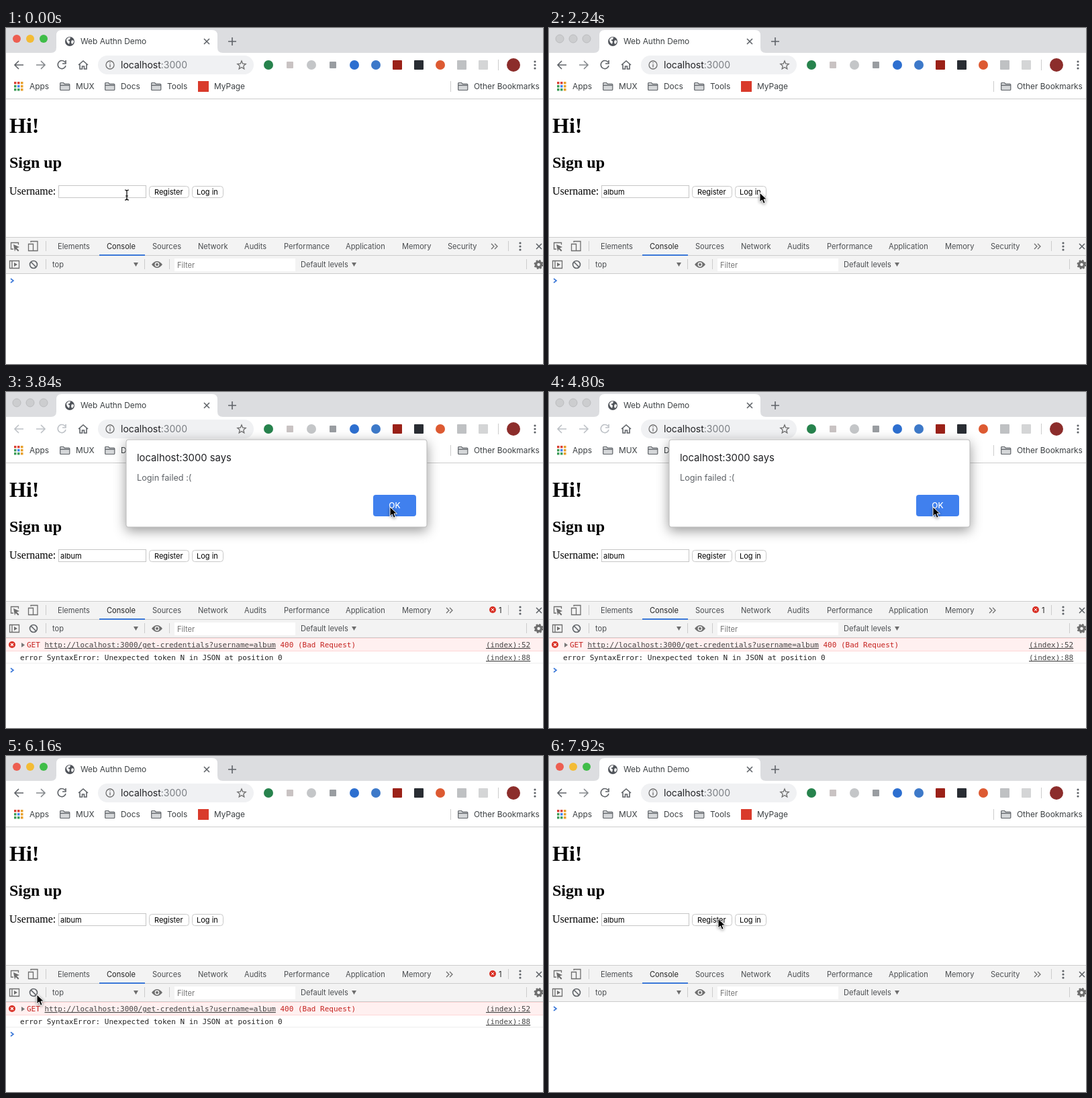
Recreate the animation shown at these times as an HTML page. Size 800 px wide and 500 px high, loop 8000 ms.

```html
<!DOCTYPE html>
<html lang="en">
<head>
<meta charset="utf-8">
<title>Web Authn Demo</title>
<style>
  html, body { margin: 0; width: 100%; height: 100%; overflow: hidden; background: #fff; }
  svg { display: block; width: 800px; height: 500px; }
  text { font-family: Inter, Roboto, sans-serif; font-size: 11.9px; fill: #3c4043; white-space: pre; }
  .page text { font-family: "Liberation Serif", serif; font-size: 16px; fill: #000; }
  .page .heading { font-weight: bold; }
  .page .control { font: 11px Inter, sans-serif; }
  .dev text { font-size: 11.1px; fill: #4a4d50; }
  .dev .log text { font: 11px "DejaVu Sans Mono", monospace; fill: #222; }
  .dev .log .red { fill: #c5221f; }
  .dev .log .link { fill: #444; text-decoration: underline; }
  .line { fill: none; stroke: #5f6368; stroke-width: 1.6; }
  .thin { fill: none; stroke: #6e6e6e; stroke-width: 1.3; }
  .rule { fill: none; stroke: #ccc; }
  .soft { filter: drop-shadow(0 1px 2px #0007); }
</style>
</head>
<body>
<svg viewBox="0 0 800 500">
  <defs>
    <path id="folder" d="M.7 10.5V1.5q0-1 1-1h4l1.6 1.8h6.5q1 0 1 1v7.2q0 1-1 1H1.7q-1 0-1-1zM1 4.3h13.5" fill="#d5d7d9" stroke="#5f6368" stroke-width="1.2"/>
    <g id="dots"><circle cy="-5" r="1.6"/><circle r="1.6"/><circle cy="5" r="1.6"/></g>
  </defs>
  <rect width="800" height="500" fill="#fff"/>

  <!-- tab strip -->
  <rect width="800" height="37" fill="#dcdde0"/>
  <path d="M67 37q8 0 8-8V11q0-8 8-8h224q8 0 8 8v18q0 8 8 8z" fill="#fff"/>
  <g id="lights"><circle cx="16" cy="16" r="6"/><circle cx="36" cy="16" r="6"/><circle cx="56" cy="16" r="6"/></g>
  <circle cx="95" cy="20" r="7" fill="#50545a"/>
  <path d="M90 17q3-4 6-3l-1 3-3 1 3 2-1 4q-4-2-4-7zm8 1l3 1q0 4-3 5l-1-3z" fill="#fff"/>
  <text x="111" y="24">Web Authn Demo</text>
  <path class="line" d="M295 16l8 8m0-8l-8 8M331 20h12m-6-6v12"/>

  <!-- toolbar -->
  <g class="line">
    <g id="nav">
      <path d="M26 55H13m6-6l-6 6 6 6"/>
      <path id="forward" d="M45 55h13m-6-6l6 6-6 6"/>
      <path d="M88 51a6 6 0 1 0 1 5m0-8v5h-5"/>
    </g>
    <path d="M108 55l7-6 7 6m-12-1v7h3.500v-4h3v4h3.500v-7"/>
  </g>
  <rect x="137" y="41" width="232" height="28" rx="14" fill="#f0f1f3"/>
  <circle class="thin" cx="155" cy="55" r="6"/>
  <path class="thin" d="M155 51v1.500m0 1.500v4.500"/>
  <text x="171" y="60" style="font-size:14px;fill:#202124">localhost<tspan fill="#7a7e83">:3000</tspan></text>
  <path class="thin" d="M351 49l1.700 4.100 4.500.4-3.400 2.900 1 4.400-3.800-2.300-3.800 2.300 1-4.400-3.400-2.900 4.500-.4z"/>
  <g id="extensions"></g>
  <path class="rule" d="M733.500 47v16M662.500 79v16"/>
  <circle cx="756" cy="55" r="10" fill="#8c2d2b"/>
  <use href="#dots" x="788" y="55" fill="#5f6368"/>

  <!-- bookmarks -->
  <g id="apps"></g>
  <text x="35" y="91">Apps</text>
  <use href="#folder" x="80" y="81"/><text x="104" y="91">MUX</text>
  <use href="#folder" x="147" y="81"/><text x="171" y="91">Docs</text>
  <use href="#folder" x="216" y="81"/><text x="240" y="91">Tools</text>
  <rect x="286" y="79" width="16" height="16" fill="#d93a2b"/><text x="310" y="91">MyPage</text>
  <use href="#folder" x="673" y="81"/><text x="697" y="91">Other Bookmarks</text>
  <path class="rule" d="M0 105.500h800"/>

  <g class="page">
    <text class="heading" x="5" y="156" style="font-size:32px">Hi!</text>
    <text class="heading" x="5" y="208" style="font-size:24px">Sign up</text>
    <text x="5" y="248">Username:</text>
    <rect x="78.500" y="234.500" width="130" height="18" fill="#fff" stroke="#c6c6c6"/>
    <rect id="focus" x="78" y="234" width="131.500" height="19" rx="1.500" fill="none" stroke="#5e93e5" stroke-width="2.600"/>
    <text class="control" id="typed" x="81" y="248"></text>
    <path id="caret" d="M0 237v13" stroke="#000"/>
    <g fill="#fff" stroke="#c9c9c9">
      <rect x="213.500" y="235.500" width="59" height="17" rx="4"/>
      <rect x="277.500" y="235.500" width="46" height="17" rx="4"/>
    </g>
    <text class="control" x="221" y="248">Register</text>
    <text class="control" x="284" y="248">Log in</text>
  </g>

  <g class="dev">
    <rect y="312" width="800" height="53" fill="#f3f3f3"/>
    <path class="rule" d="M0 311.500h800M0 338.500h800M0 365.500h800M59.500 317v15M748.500 317v15M59.500 344v15M206.500 344v15M243.500 344v15M775.500 344v15"/>
    <path class="thin" d="M11 329H7.500v-9.500h11v3M37 319v-1.500h10v14h-6M33.500 321.500h7v10h-7z"/>
    <path d="M11 322l9 4-4 1.500 3.500 3.500-1.500 1.500-3.500-3.500-1.500 3.500z" fill="#6e6e6e"/>
    <text x="77" y="329">Elements</text>
    <text x="150" y="329" style="fill:#222">Console</text>
    <text x="218" y="329">Sources</text>
    <text x="286" y="329">Network</text>
    <text x="355" y="329">Audits</text>
    <text x="414" y="329">Performance</text>
    <text x="506" y="329">Application</text>
    <text x="590" y="329">Memory</text>
    <text id="security" x="658" y="329">Security</text>
    <path id="more" class="thin" d="M0 321l4 4-4 4m5-8l4 4-4 4"/>
    <rect x="139" y="337" width="68" height="2" fill="#3b78d8"/>
    <use href="#dots" x="766" y="325" fill="#5f6368"/>
    <path class="line" d="M790 321l8 8m0-8l-8 8"/>

    <path class="thin" d="M5.500 346.500h14v11h-14zm3.500 0v11"/>
    <path d="M12 349l5 3-5 3zM190 349h7l-3.500 6zM515 349h7l-3.500 6z" fill="#6e6e6e"/>
    <g class="line"><circle cx="41" cy="352" r="5.500"/><path d="M37 348l8 8"/></g>
    <text x="69" y="356">top</text>
    <path d="M217 352q8-10 16 0-8 10-16 0" fill="#6e6e6e"/>
    <circle cx="225" cy="352" r="2.700" fill="#6e6e6e" stroke="#f3f3f3" stroke-width="1.400"/>
    <rect x="251" y="343" width="180" height="19" fill="#fff"/>
    <text x="255" y="357" style="fill:#777">Filter</text>
    <text x="439" y="356">Default levels</text>
    <circle cx="793.500" cy="352" r="4" fill="none" stroke="#6e6e6e" stroke-width="3.500"/>
    <circle cx="793.500" cy="352" r="6" fill="none" stroke="#6e6e6e" stroke-width="2" stroke-dasharray="2.500 2.210"/>

    <g id="errors" class="log">
      <circle cx="725" cy="324" r="5" fill="#d93025"/>
      <path d="M723 322l4 4m0-4l-4 4" stroke="#fff"/>
      <text x="734" y="329" style="font:11.100px Inter,sans-serif">1</text>
      <rect y="366" width="800" height="19" fill="#fff0f0"/>
      <path d="M0 366.500h800M0 385.500h800" stroke="#ffd7d7"/>
      <path d="M0 403.500h800" stroke="#eee"/>
      <circle cx="9" cy="376" r="5" fill="#d93025"/>
      <path d="M7 374l4 4m0-4l-4 4" stroke="#fff" stroke-width="1.300"/>
      <path d="M23 373l5 3.500-5 3.500z" fill="#777"/>
      <text class="red" x="31" y="380">GET <tspan class="link">http://localhost:3000/get-credentials?username=album</tspan> 400 (Bad Request)</text>
      <text class="link" x="715" y="380">(index):52</text>
      <text x="21" y="399">error SyntaxError: Unexpected token N in JSON at position 0</text>
      <text class="link" x="715" y="399">(index):88</text>
    </g>
    <path id="prompt" d="M7 373l4 3-4 3" fill="none" stroke="#3b78d8" stroke-width="1.600"/>
    <g id="tooltip">
      <rect class="soft" x="27" y="369" width="160" height="23" rx="2" fill="#fff"/>
      <text x="36" y="384">Clear console</text>
      <text x="118" y="384" style="fill:#888">Ctrl L</text>
      <text x="156" y="384" style="fill:#888">⌘ K</text>
    </g>
  </g>

  <g id="suggestions">
    <rect id="list" class="soft" x="78" y="254" width="192" rx="3" fill="#fff"/>
    <g id="names"></g>
  </g>

  <g id="dialog">
    <rect x="179" y="71" width="448" height="130" rx="3" fill="#fff" stroke="#bbb" style="filter:drop-shadow(0 5px 9px #0006)"/>
    <text x="195" y="103" style="font-size:14.800px;fill:#202124">localhost:3000 says</text>
    <text x="195" y="132" style="font-size:12.700px;fill:#5f6368">Login failed :(</text>
    <rect x="547" y="153" width="64" height="32" rx="4" fill="#4080ee"/>
    <text x="579" y="173" text-anchor="middle" style="font-weight:500;fill:#fff">OK</text>
  </g>

  <path id="beam" d="M-3-7q3 0 3 2V6q0 2-3 2M3-7q-3 0-3 2V6q0 2 3 2M-2 2h4" fill="none" stroke="#000" stroke-width="1.200"/>
  <path id="arrow" class="soft" d="M0 0v14l3.300-3 2.300 5.300 2.600-1.100L6 10h4.500z" fill="#000" stroke="#fff"/>
</svg>
<script>
const $ = id => document.getElementById(id);
const show = (id, on) => $(id).style.opacity = +on;
const clamp = v => Math.min(1, Math.max(0, v));
const between = (t, from, to) => t >= from && t < to;
const fade = (t, from, length) => clamp((t - from) / length);

const LOOP = 8000, STEP = 80;
const NAMES = ['acorn', 'atmo', 'bramble', 'demo', 'tester'];
const KEYS = [['a', 800], ['l', 960], ['b', 1200], ['u', 1360], ['m', 1520]];

// Pointer moves: start time, end time, from, to
const MOVES = [
  [1600, 2080, [180, 248], [314, 245]],
  [2800, 3600, [314, 245], [572, 171]],
  [5000, 6100, [572, 171], [46, 355]],
  [7000, 7760, [46, 355], [252, 242]],
];

// Toolbar icons reduced to plain shapes: round or square, and colour
const ICONS = ['o#27834d', 's#c9c3c3', 'o#c4c6c8', 's#999da1', 'o#2d6fd0', 'o#3d79c9',
  's#9b2118', 's#292d33', 'o#dd5a32', 's#bfc1c3', 's#d4d5d6'];
$('extensions').innerHTML = ICONS.map((icon, i) => {
  const half = i === 1 || i === 3 ? 5 : 7;
  return `<rect x="${391 + i * 32 - half}" y="${55 - half}" width="${half * 2}" height="${half * 2}"
    rx="${icon[0] === 'o' ? half : 1}" fill="${icon.slice(1)}"/>`;
}).join('');

const APP_COLORS = ['#db4437', '#db4437', '#e8a02c', '#3f9e5a', '#4285f4', '#e8a02c', '#3f9e5a', '#3f9e5a', '#e8a02c'];
$('apps').innerHTML = APP_COLORS.map((color, i) =>
  `<rect x="${12 + i % 3 * 5}" y="${80 + Math.floor(i / 3) * 5}" width="3.5" height="3.500" fill="${color}"/>`).join('');

$('names').innerHTML = NAMES.map((name, i) =>
  `<text x="90" y="${285 + i * 36}" style="font-size:13px;font-weight:500;fill:#202124">${name}</text>`).join('');

const ease = p => p * p * (3 - 2 * p);

function pointerAt(t) {
  let position = MOVES[0][2];
  for (const [start, end, from, to] of MOVES) {
    if (t < start) break;
    const p = ease(clamp((t - start) / (end - start)));
    position = from.map((v, i) => v + (to[i] - v) * p);
  }
  return position;
}

function paintLights(active) {
  const colors = active ? ['#ed5e51', '#f3bc35', '#3fbd48'] : Array(3).fill('#cccdcf');
  [...$('lights').children].forEach((light, i) => {
    light.setAttribute('fill', colors[i]);
    light.setAttribute('stroke', active ? 'none' : '#bbbcbe');
  });
}

function draw(t) {
  const typed = KEYS.filter(key => t >= key[1]).map(key => key[0]).join('');
  const focused = between(t, 320, 2160);
  $('typed').textContent = typed;
  show('focus', focused);
  show('caret', focused && (t < 1600 || t % 1000 < 500));
  const caretX = typed ? 81 + $('typed').getComputedTextLength() : 82;
  $('caret').setAttribute('transform', `translate(${Math.round(caretX) + .5})`);

  const count = typed ? 2 : NAMES.length;
  show('suggestions', between(t, 320, 960));
  $('list').setAttribute('height', 16 + 36 * count);
  [...$('names').children].forEach((name, i) => name.style.opacity = +(i < count));

  paintLights(!between(t, 2160, 4960));
  const loading = between(t, 2320, 4960);
  $('nav').style.stroke = loading ? '#bdc1c6' : '#5f6368';
  $('forward').style.stroke = loading ? '#bdc1c6' : '#85898d';
  show('dialog', fade(t, 2240, 160) * (1 - fade(t, 4880, 240)));

  const failed = between(t, 2320, 6960);
  show('errors', failed);
  show('security', !failed);
  $('more').setAttribute('transform', `translate(${failed ? 656 : 723})`);
  $('prompt').setAttribute('transform', `translate(0 ${failed ? 38 : 0})`);
  show('tooltip', between(t, 0, 6960) ? fade(t, 6640, 130) : 0);

  const [x, y] = pointerAt(t);
  const overField = x < 210 && t < 2080;
  $('beam').setAttribute('transform', `translate(${x} ${y})`);
  $('arrow').setAttribute('transform', `translate(${x} ${y})`);
  show('beam', overField && !between(t, 800, 1600));
  show('arrow', !overField);
}

function tick(now) {
  draw(Math.floor(now % LOOP / STEP) * STEP);
  requestAnimationFrame(tick);
}
requestAnimationFrame(tick);
</script>
</body>
</html>
```
